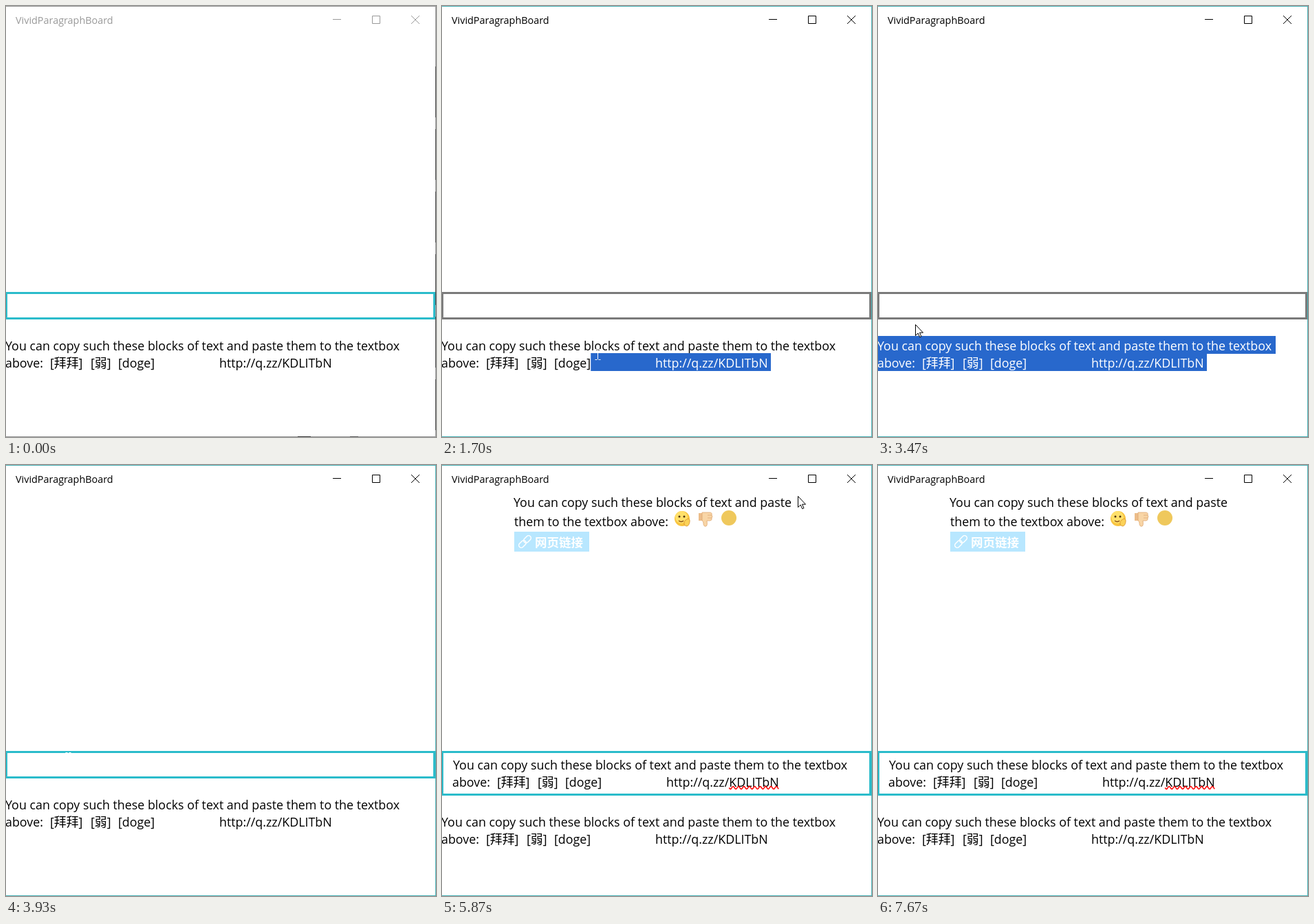
An HTML page with a canvas that plays this animation: 625x627 px, repeating every 8 s.

```html
<!DOCTYPE html>
<html lang="en">
<head>
<meta charset="utf-8">
<title>Rich text demo</title>
<style>
  html, body { margin: 0; width: 100%; height: 100%; overflow: hidden; background: #fff; }
  canvas { display: block; }
</style>
</head>
<body>
<canvas id="stage" width="625" height="627"></canvas>
<script>
const LOOP = 8000;
const ctx = document.getElementById('stage').getContext('2d');
const FAMILY = '"Open Sans", "Noto Sans", "Noto Sans CJK SC", "Noto Sans CJK", sans-serif';
const BODY = `17.85px ${FAMILY}`;
const TEAL = '#2bbccb', BLUE = '#2868cc';

// Moments at which the state changes, in ms
const ACTIVATE = 1260, SELECT = 1280, HOVER = 3480, FOCUS = 3930, PASTE = 4450, CARET = 4080;

const LINE_1 = 'You can copy such these blocks of text and paste them to the textbox';
const URL_HEAD = 'http://q.zz/', URL_TAIL = 'KDLITbN';
const LINE_2 = [[-1, 'above:'], [64, '[拜拜]'], [123, '[弱]'], [163, '[doge]'], [310, URL_HEAD + URL_TAIL]];

// Pointer path: time, x, y
const POINTER = [
  [410, 532, -30], [440, 528, 40], [560, 418, 290], [690, 448, 535], [740, 490, 518],
  [1260, 490, 518], [1660, 250, 508], [2060, 20, 496], [2200, 20, 496], [2320, 11, 496],
  [2510, 6, 496], [2770, 6, 496], [2800, 2, 496], [3330, 2, 496], [3570, 90, 440],
  [3750, 90, 440], [3770, 90, 426], [5610, 90, 426], [5680, 140, 380], [5800, 430, 95],
  [5870, 517, 45], [5950, 545, 20], [6050, 556, -25], [7190, 564, -25], [7300, 455, 22], [7410, 345, -25]
];

const clamp = v => Math.max(0, Math.min(1, v));

function pointerAt(t) {
  const next = POINTER.findIndex(p => p[0] > t);
  if (next < 1) return POINTER[next < 0 ? POINTER.length - 1 : 0].slice(1);
  const [t0, x0, y0] = POINTER[next - 1], [t1, x1, y1] = POINTER[next];
  const k = (t - t0) / (t1 - t0);
  return [x0 + (x1 - x0) * k, y0 + (y1 - y0) * k];
}

function text(str, x, y, color = '#000', font = BODY) {
  ctx.font = font;
  ctx.fillStyle = color;
  ctx.fillText(str, x, y);
}

function rect(x, y, w, h, color) {
  ctx.fillStyle = color;
  ctx.fillRect(x, y, w, h);
}

function shape(path, fill, stroke, width = 1) {
  const p = new Path2D(path);
  if (fill) { ctx.fillStyle = fill; ctx.fill(p); }
  if (stroke) { ctx.strokeStyle = stroke; ctx.lineWidth = width; ctx.stroke(p); }
}

function disc(x, y, r, color) {
  ctx.fillStyle = color;
  ctx.beginPath();
  ctx.arc(x, y, r, 0, Math.PI * 2);
  ctx.fill();
}

function at(x, y, draw) {
  ctx.save();
  ctx.translate(x, y);
  draw();
  ctx.restore();
}

function clipped(rects, draw) {
  ctx.save();
  ctx.beginPath();
  rects.forEach(r => ctx.rect(...r));
  ctx.clip();
  draw();
  ctx.restore();
}

// Both lines: the first starts at (x, y), the second is moved by dx
function paragraph(x, dx, y, color) {
  text(LINE_1, x, y, color);
  LINE_2.forEach(([start, str]) => text(str, dx + start, y + 25, color));
}

// Nearest gap between characters
function snap(segments, x) {
  ctx.font = BODY;
  let best = Infinity;
  for (const [start, str] of segments)
    for (let i = 0; i <= str.length; i++) {
      const stop = start + ctx.measureText(str.slice(0, i)).width;
      if (Math.abs(stop - x) < Math.abs(best - x)) best = stop;
    }
  return best;
}

function selectionRects(t) {
  if (t < SELECT || t >= FOCUS) return [];
  const [x, y] = pointerAt(Math.min(t, 3000));
  if (y > 506) {
    const from = snap(LINE_2, x);
    return [[from, 505, Math.max(0, 478 - from), 26]];
  }
  const from = Math.max(0, snap([[-1, LINE_1]], x));
  return [[from, 480, 578 - from, 26], [0, 505, 478, 26]];
}

function windowFrame(active) {
  const ink = active ? '#000' : '#999';
  const edge = active ? '#48b0b5' : '#969696';
  rect(0, 0, 625, 1, edge);
  rect(624, 0, 1, 627, edge);
  rect(0, 626, 625, 1, edge);
  if (!active) {
    for (let y = 88; y < 600; y += 91) rect(624, y, 1, 74, '#444');
    rect(424, 626, 19, 1, '#333');
    rect(500, 626, 12, 1, '#555');
  }
  text('VividParagraphBoard', 14, 26, ink, `14.4px ${FAMILY}`);
  shape('M475 19.5h12M532.5 14.5h11v11h-11zM589 14l12 12M601 14l-12 12', null, ink);
}

function wavingFace() {
  disc(0, 0, 11, '#f9c440');
  disc(-1, -2, 9, '#ffe06a');
  disc(-4, -3, 1.5, '#4b3010');
  disc(3, -3, 1.5, '#4b3010');
  shape('M-5 3q4 3 7 0', null, '#8a4d18', 1.3);
  shape('M3 9q-1-5 2-7l4-2q3 1 2 5q-1 6-5 6z', '#fbd258', '#d8912a', .8);
}

function thumbDown() {
  shape('M-10-8h5v11h-5z', '#ecbd8a');
  shape('M-5-9h11q4 0 3 4q2 2 0 4q1 3-2 4h-5q1 7-1 8q-4 1-4-4q0-3-2-4z', '#f8d5a6', '#dfa772', .8);
  shape('M3-5h6M3-1h6', null, '#dfa772', .8);
}

function richText() {
  text('You can copy such these blocks of text and paste', 104, 61);
  text('them to the textbox above:', 105, 89);
  at(349, 78, wavingFace);
  at(383, 78, thumbDown);
  disc(417, 77, 11, '#efc85c');
  rect(105, 97, 109, 29, '#b8e7ff');
  at(120.5, 111.5, () => {
    ctx.rotate(-Math.PI / 4);
    ctx.strokeStyle = '#fff';
    ctx.lineWidth = 1.5;
    for (const x of [-11, -1]) {
      ctx.beginPath();
      ctx.roundRect(x, -3.5, 12, 7, 3.5);
      ctx.stroke();
    }
  });
  text('网页链接', 135, 118.5, '#fff', `bold 17.5px ${FAMILY}`);
}

function squiggle() {
  ctx.font = BODY;
  const from = 326 + ctx.measureText(URL_HEAD).width;
  const to = from + ctx.measureText(URL_TAIL).width;
  ctx.strokeStyle = '#f00';
  ctx.lineWidth = 1.5;
  ctx.beginPath();
  for (let x = from; x <= to; x++) ctx.lineTo(x, 469.5 + 2 * Math.sin((x - from) * .8));
  ctx.stroke();
}

// On for 500 ms, off for 500 ms, each change fading over 80 ms
function caretAlpha(t) {
  if (t < CARET) return 0;
  const phase = (t - CARET) % 1000;
  return phase < 500 ? clamp((phase + 20) / 80) : 1 - clamp((phase - 480) / 80);
}

function textBox(t, height) {
  const focused = t < SELECT || t >= FOCUS;
  ctx.strokeStyle = focused ? TEAL : t >= HOVER ? '#333' : '#7a7a7a';
  ctx.lineWidth = 3;
  ctx.strokeRect(.5, 417.5, 622, height - 3);
  clipped([[3, 420, 618, height - 12]], () => {
    const pasted = t >= PASTE;
    if (pasted) {
      paragraph(16, 16, 443);
      squiggle();
    }
    ctx.globalAlpha = caretAlpha(t);
    rect(pasted ? 495 : 15, pasted ? 448 : 423, 1, 25, '#000');
  });
}

function pointer(t, height) {
  const [x, y] = pointerAt(t).map(Math.round);
  const overText = (y >= 416 && y < 416 + height) || (y >= 440 + height && y < 491 + height);
  at(x, y, () => {
    if (overText) shape('M-3.5-7.5h3M1.5-7.5h3M.5-7v14M-3.5 7.5h3M1.5 7.5h3', null, '#fff');
    else shape('M.5.5v16l3.7-3.5 2.5 5.7 2.3-1-2.5-5.5h5z', '#fff', '#000');
  });
}

function draw(t) {
  const growth = 1 - (1 - clamp((t - PASTE) / 200)) ** 3.5;
  const height = Math.round(40 + 25 * growth);
  rect(0, 0, 625, 627, '#fff');
  windowFrame(t >= ACTIVATE);
  if (t >= PASTE) richText();
  textBox(t, height);

  const blockY = 461 + height;
  paragraph(-1, 0, blockY);
  const selected = selectionRects(t);
  if (selected.length) clipped(selected, () => {
    rect(0, 480, 625, 51, BLUE);
    paragraph(-1, 0, blockY, '#fff');
  });
  pointer(t, height);
}

const start = performance.now();
function tick() {
  draw((performance.now() - start) % LOOP);
  requestAnimationFrame(tick);
}
tick();
</script>
</body>
</html>
```
